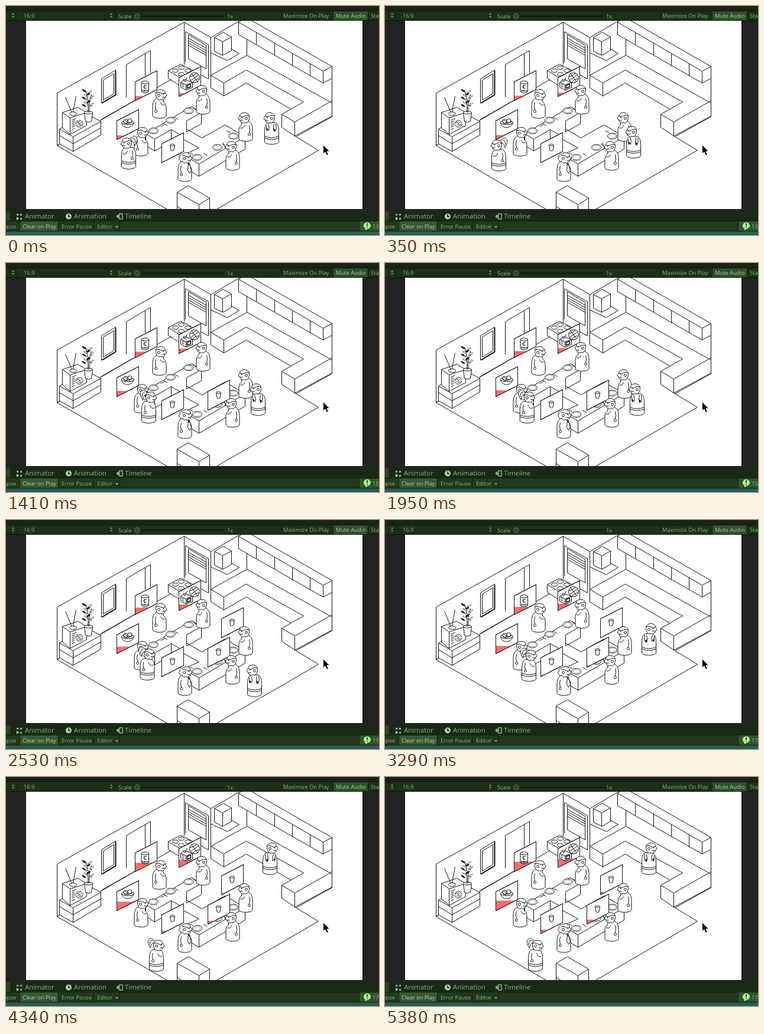
Write an HTML page that moves like this. It is 631 px wide and 388 px high and loops after 5480 ms.

```html
<!DOCTYPE html>
<html lang="en">
<head>
<meta charset="utf-8">
<title>Isometric restaurant</title>
<style>
html, body { margin: 0; width: 100%; height: 100%; overflow: hidden; background: #222; }
svg { display: block; }
text { font: 9.4px "Open Sans", "Noto Sans", sans-serif; fill: #83b47b; }
.tab { font-size: 11.4px; }
.ink { fill: none; stroke: #111; stroke-width: 1; stroke-linejoin: round; }
.white { fill: #fff; }
.solid { fill: #111; }
</style>
</head>
<body>
<svg width="631" height="388" viewBox="0 0 631 388">
<defs>
  <clipPath id="view"><rect x="34" y="25" width="569" height="319"/></clipPath>
  <clipPath id="card"><path d="M0 0L37-19V13L0 32Z"/></clipPath>

  <g id="plate">
    <ellipse class="white" rx="8" ry="5"/>
    <ellipse rx="5.500" ry="3.200" stroke-width=".4"/>
  </g>

  <g id="glass">
    <path d="M14 0L15.500 9Q18 11 20.500 9L22 0"/>
    <ellipse cx="18" cy="0" rx="4" ry="1.500"/>
  </g>
  <g id="can">
    <path d="M10.500 1V15.500C11 19.500 22.500 19.500 23 15.500V1"/>
    <ellipse cx="16.700" cy="1" rx="6.300" ry="2.500"/>
    <text x="13.700" y="11.500" style="font-size:9px;font-weight:700;fill:#111" stroke="none">C</text>
    <text x="11.500" y="16" style="font-size:4px;font-weight:700;fill:#111" stroke="none">MASH</text>
  </g>
  <g id="bowl">
    <path d="M8 3C9 14 27 15 29 2"/>
    <ellipse class="white" cx="18.500" cy="3" rx="10.500" ry="3.500"/>
    <circle class="white" cx="15" cy="1" r="3.500"/>
    <circle class="white" cx="22" cy="0" r="3.500"/>
    <path d="M11 2Q17 8 26 1M13-2L18 3"/>
  </g>
  <g id="ball">
    <circle class="white" r="8.500"/>
    <path d="M-7 5L7-5M-5-7L5 7M-8-2Q0-3 3-8M-3 8Q1 2 8 2"/>
  </g>
  <g id="show">
    <use href="#ball" x="26.500" y="0"/>
    <path class="white" d="M3 8L10 3 23 8V17L12 21 3 16Z"/>
    <path d="M3 8L12 12 23 8M12 12V21M7 2L10 7 14-1M5 11L9 13M5 14L9 16"/>
    <path d="M14 13L20 11V15.500L14 18Z" stroke-width="1.500"/>
  </g>

  <g id="body">
    <path class="white" d="M-11.500-4V-20C-11.500-28-9-32-5-34H5C7-32 7-30 7-28Q11-26 11.500-20V-4C9 1-9 1-11.500-4Z"/>
    <path d="M-6-27Q-8-21-6-14"/>
    <circle class="white" cx="-6" cy="-12" r="2"/>
  </g>
  <g id="head">
    <path class="white" d="M8-3C8-11-8-11-8-2C-8 2-7 5-5 7Q-3 10 0 8Q4 10 5 7Q8 7 8 3Q11 3 10 0Z"/>
    <path d="M-8-3Q-3-6 0-3T8-3M3 4H7"/>
    <circle cx="-3" cy="1" r="2"/>
    <circle class="solid" cx="5" cy="-.5" r=".4"/>
  </g>
  <g id="guest">
    <use href="#body"/>
    <path d="M2-27Q4-21 9-23"/>
    <use href="#head" x="2" y="-40"/>
  </g>
  <g id="gent">
    <use href="#body"/>
    <use href="#head" x="2" y="-40"/>
    <path class="white" d="M-5-47Q-10-46-8-41Q-12-39-8-36Q-7-32-3-35M8-47Q12-50 13-45"/>
    <path d="M4-31L9-30M6-30L5-19 8-14 11-19 8-30"/>
  </g>
  <g id="worker">
    <path class="white" d="M-12-4V-22C-12-31-10-35-6-37H6C10-35 12-30 12-22V-4C9 1-9 1-12-4Z"/>
    <path d="M-12-14Q0-9 12-14M-12-11Q0-6 12-11"/>
  </g>
  <g id="waitress">
    <path class="white" d="M-3-51C-7-61-16-55-14-48Q-13-43-10-40Q-10-46-4-49Z"/>
    <path d="M-6-53Q-12-53-11-45"/>
    <use href="#worker"/>
    <path d="M-6-31Q-8-26-6-20M2-31Q4-23 10-26"/>
    <circle class="white" cx="-6" cy="-18" r="2"/>
    <use href="#head" x="3" y="-44"/>
  </g>
  <g id="waiter">
    <use href="#worker"/>
    <path d="M-7-35Q-9-28-6-22M6-35Q3-28 5-23M-4-35L-3-27M9-32L8-24"/>
    <path class="solid" d="M-6-25L-3-27-4-22ZM6-26L9-27 8-23Z"/>
    <use href="#head" x="3" y="-45"/>
  </g>
</defs>

<rect width="631" height="388" fill="#222"/>
<rect x="34" y="25" width="569" height="319" fill="#fff"/>

<g clip-path="url(#view)"><g class="ink" transform="translate(-.5 -.5)">
  <!-- walls and floor -->
  <path d="M87 148L302 28 347 54 395 26M87 148V237L275 346M87 237L302 112M302 28V100M347 54V120M161 193L219 160M394 28V49M408 36V84M529 245L355 346M529 245L491 222"/>
  <path d="M204 155V100L236 81V119M236 81L245 76V114M304 44L343 66V124L330 117M304 44V96M309 49V90L339 107V67ZM309 55L339 72M309 59L339 76M309 63L339 80M309 67L339 84"/>
  <!-- picture -->
  <path d="M162 124L186 109V151L162 165ZM165 126L183 115V149L165 160Z"/>
  <path d="M186 110V151L163 165" stroke-width="2"/>
  <!-- wall cupboards -->
  <path class="white" d="M394 28L400 24H414L552 103V123L537 131 394 49Z"/>
  <path d="M394 28L537 111 552 103M537 111V131M424 45V66M455 63V84M485 81V102M515 98V119M552 123V188"/>
  <!-- oven and shelf -->
  <path class="white" d="M347 80L375 93 395 81 381 73M353 54L368 45 382 53V76L367 84 353 77Z"/>
  <path d="M353 54L367 61 382 53M367 61V84"/>
  <!-- kitchen counter -->
  <path class="white" d="M347 118L408 84 552 165V188L491 222 467 206V184L504 163 407 109 369 131V153L347 139Z"/>
  <path d="M347 118L369 131M369 153L407 131 482 175M467 184L489 197 552 161M489 197V221L552 187"/>
  <!-- stove -->
  <path class="white" d="M275 110L296 99 319 111V124L297 137 275 123Z"/>
  <path d="M275 110L297 123 319 111M297 123V137"/>
  <g id="burners"></g>
  <!-- television corner -->
  <path class="white" d="M91 209L138 184 161 196V219L114 247 91 234Z"/>
  <path d="M91 209L114 222 161 196M114 222V247M91 220L114 234 161 207M87 237L91 234"/>
  <path class="white" d="M96 181L122 172 137 181V203L109 218 96 207Z"/>
  <path d="M96 181L109 190 137 181M109 190V218M101 155L113 184 119 153M112 194L119 191M112 197L117 195M112 200L117 198M112 203L117 201M112 206L117 204M112 210L117 208"/>
  <ellipse class="white" cx="114" cy="183" rx="6" ry="3"/>
  <use href="#ball" transform="translate(124.500 200) scale(.7)"/>
  <path class="white" d="M133 181L135 196Q140 199 145 196L147 181Z"/>
  <ellipse class="white" cx="140" cy="181" rx="7" ry="2.500"/>
  <path d="M139 181Q141 164 135 143M141 181Q140 166 145 150"/>
  <g id="leaves" class="solid"></g>
  <!-- dining table -->
  <path class="white" d="M237 217L314 171 331 181V200L306 214V209L332 224 371 202 405 222V243L327 289 300 273V253L327 241 300 226V238L280 230 252 246 237 237Z"/>
  <path d="M237 217L252 226 280 210 300 221V226M252 226V246M280 210V230M331 181L306 195V209M300 253L327 268 405 222M327 268V289"/>
  <use href="#plate" x="250" y="212"/><use href="#plate" x="279" y="194"/><use href="#plate" x="309.500" y="178"/>
  <use href="#plate" x="324" y="257"/><use href="#plate" x="358" y="240"/><use href="#plate" x="385" y="221"/>
  <path d="M262 205L269 201M267 199L273 203M286 189L292 193M317 173L322 177M335 250L341 254M366 234L371 238M368 232L372 242M394 225L399 228M373 212L380 215"/>
  <!-- box at the front -->
  <path class="white" d="M290 316L309 305 345 326V350H290Z"/>
  <path d="M290 316L327 337 345 326M327 337V350M290 340L299 346"/>
  <g id="cards"></g>
  <use href="#guest" transform="translate(260 191)"/>
  <use href="#guest" transform="translate(334 184) scale(-1 1)"/>
  <use href="#guest" transform="translate(229 255)"/>
  <use href="#guest" transform="translate(406 230) scale(-1 1)"/>
  <use href="#gent" transform="translate(303 298)"/>
  <use href="#guest" transform="translate(384 279) scale(-1 1)"/>
  <use id="her" href="#waitress"/>
  <use id="him" href="#waiter"/>
</g></g>

<!-- upper toolbar -->
<rect width="631" height="25" fill="#1d3019"/>
<rect width="631" height="8" fill="#182416"/>
<path d="M0 8.500H631M0 24.500H631" stroke="#10190e"/>
<rect x="554" y="9" width="58" height="15" fill="#30502b"/>
<path d="M18.500 9V24M184.500 9V24M465.500 9V24M553.500 9V24M612.500 9V24" stroke="#142011"/>
<path d="M10 15L12 12 14 15ZM10 17L12 20 14 17ZM176 15L178 12 180 15ZM176 17L178 20 180 17Z" fill="#6f9a68"/>
<path d="M222 17.500H368" stroke="#0f180d" stroke-width="2"/>
<circle cx="222" cy="17.500" r="4.500" fill="#2f4929" stroke="#58764f"/>
<text x="30" y="20">16:9</text>
<text x="190" y="21">Scale</text>
<text x="374" y="21">1x</text>
<text x="469" y="20">Maximize On Play</text>
<text x="558" y="20" style="fill:#a3d39a">Mute Audio</text>
<text x="617" y="20">Sta</text>

<!-- lower panels -->
<rect y="344" width="631" height="44" fill="#1a2917"/>
<rect y="348" width="7" height="17" fill="#2a4425"/>
<rect y="365" width="631" height="17" fill="#22391e"/>
<rect x="24" y="365" width="64" height="16" fill="#3a5834"/>
<rect x="598" y="365" width="33" height="16" fill="#35522f"/>
<rect y="382" width="631" height="6" fill="#2b5c53"/>
<path d="M0 364.500H631M0 381.500H631M23.500 365V381M88.500 365V381M148.500 365V381M192.500 365V381M597.500 365V381" stroke="#13200f"/>
<path d="M18 352H21V355H18ZM24 352H27V355H24ZM24 359H27V362H24Z" fill="#83b47b"/>
<path d="M18 357L22 360 18 363Z" fill="#a9f09a"/>
<circle cx="106" cy="356.500" r="5" fill="#a5d49c"/>
<path d="M106 353V357H109" fill="none" stroke="#1a2917" stroke-width="1.500"/>
<path d="M192 352H197V361H192Z" fill="none" stroke="#83b47b" stroke-width="1.500"/>
<path d="M191 353V360L187 358V355Z" fill="#83b47b"/>
<text class="tab" x="32" y="360">Animator</text>
<text class="tab" x="115" y="360">Animation</text>
<text class="tab" x="201" y="360">Timeline</text>
<text x="17" y="377" text-anchor="end">apse</text>
<text x="28" y="377" style="fill:#a3d39a">Clear on Play</text>
<text x="94" y="377">Error Pause</text>
<text x="154" y="377">Editor</text>
<path d="M185 373H190L187.500 376Z" fill="#83b47b"/>
<path d="M605 372A6 5.500 0 1 1 612 377.500L608 380V377Q605 376 605 372Z" fill="#a9f58f"/>
<path d="M611 368V373M611 374.500V376" stroke="#1b3515" stroke-width="1.600"/>
<text id="count" x="620" y="377"></text>

<path id="cursor" d="M0 0V15.500L3.500 12.500 6 18 9 17 6.500 11.500H11Z" fill="#000" stroke="#fff"/>
</svg>

<script>
const LOOP = 5480;
const byId = id => document.getElementById(id);

function add(parent, tag, attributes) {
  const node = document.createElementNS("http://www.w3.org/2000/svg", tag);
  for (const name in attributes) node.setAttribute(name, attributes[name]);
  return parent.appendChild(node);
}

for (const [x, y] of [[287, 110], [297, 105], [297, 116], [308, 110]]) {
  add(byId("burners"), "ellipse", {cx: x, cy: y, rx: 5, ry: 2.8});
}
for (let i = 0; i < 14; i++) {
  const side = i % 2 ? 1 : -1;
  const x = 136 + (i % 3) * 3, y = 146 + i * 2.1;
  add(byId("leaves"), "path", {
    d: `M${x} ${y}q${side * 3}-5 ${side * 7}-4q${-side * 2} 4 ${-side * 7} 4`,
    "stroke-width": .6, fill: i % 3 ? "#fff" : "#111"
  });
}

// Order cards: the red level rises at `rate` pixels per second.
const cards = [
  {x: 188, y: 195, icon: "bowl", level: 219.8, rate: 1.85, from: 0},
  {x: 219, y: 129, icon: "can", level: 153.2, rate: 1.7, from: 0},
  {x: 293, y: 122, icon: "show", level: 148, rate: 1.7, from: 0},
  {x: 264, y: 234, icon: "glass", level: 268.8, rate: 1.8, from: 0},
  {x: 342, y: 218, icon: "glass", level: 253.4, rate: 2.1, from: 400},
  {x: 365, y: 168, icon: "glass", level: 204.8, rate: 1.8, from: 2060}
];
for (const card of cards) {
  const outline = "M0 0L37-19V13L0 32Z";
  card.node = add(byId("cards"), "g", {transform: `translate(${card.x} ${card.y})`});
  add(card.node, "path", {d: outline, class: "white"});
  const clip = add(card.node, "g", {"clip-path": "url(#card)"});
  card.fill = add(clip, "rect", {width: 37, height: 60, fill: "#fb6c6c", stroke: "none"});
  add(card.node, "path", {d: outline});
  add(card.node, "use", {href: "#" + card.icon, y: card.icon === "glass" ? 2 : 0});
}

// Each stop is [time, x, y].
const herPath = [[0, 208, 277], [420, 190, 281], [850, 190, 281], [1380, 242, 272],
  [2300, 240, 272], [2530, 239.5, 272], [3290, 244, 274], [4020, 255, 330]];
const himPath = [[0, 450, 235], [450, 413, 265], [950, 413, 265], [1350, 427, 259],
  [2100, 427, 259], [2400, 421, 300], [2840, 421, 300], [2940, 424, 287],
  [3290, 447, 230], [3540, 464, 204], [3880, 447, 166]];
const cursorPath = [[4160, 536.5, 235], [4320, 536.5, 246]];

function along(path, t) {
  const next = path.findIndex(stop => stop[0] > t);
  if (next < 0) return path[path.length - 1].slice(1);
  if (next === 0) return path[0].slice(1);
  const [t0, x0, y0] = path[next - 1], [t1, x1, y1] = path[next];
  const k = (t - t0) / (t1 - t0);
  return [x0 + (x1 - x0) * k, y0 + (y1 - y0) * k];
}

function place(id, path, t, facing = 1) {
  byId(id).setAttribute("transform", `translate(${along(path, t)}) scale(${facing} 1)`);
}

function draw(now) {
  const t = now % LOOP;
  for (const card of cards) {
    card.node.setAttribute("visibility", t >= card.from ? "visible" : "hidden");
    card.fill.setAttribute("y", card.level - card.rate * Math.min(t, 5380) / 1000 - card.y);
  }
  place("her", herPath, t, t < 420 ? -1 : 1);
  place("him", himPath, t, t < 2840 ? -1 : 1);
  place("cursor", cursorPath, t);
  byId("count").textContent = t < 400 ? 13 : t < 2060 ? 15 : 17;
  requestAnimationFrame(draw);
}
draw(0);
</script>
</body>
</html>
```
